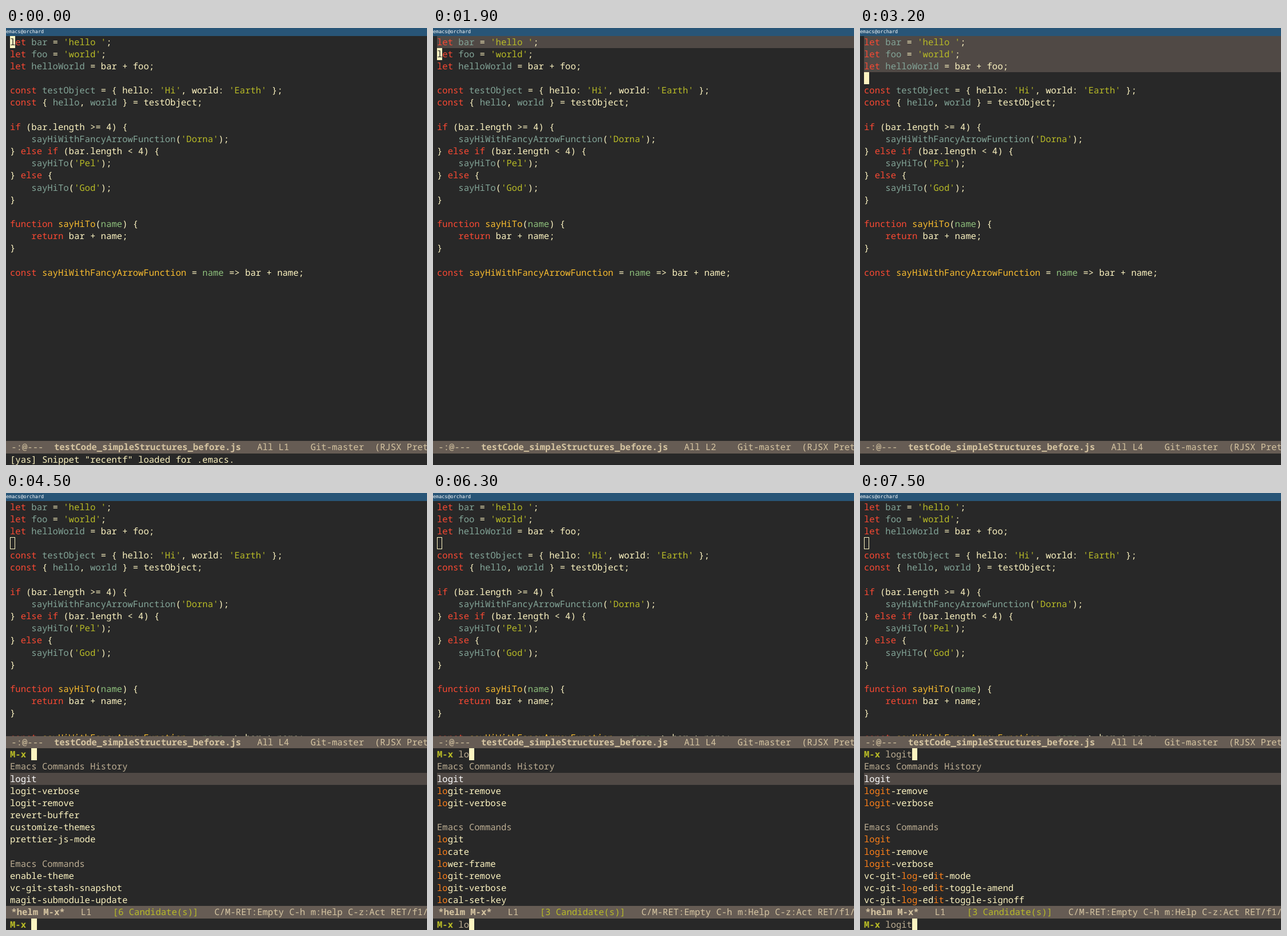
These frames come from a looping animation (735x762 px, 8 s). An HTML page:

```html
<!DOCTYPE html>
<html lang="en">
<head>
<meta charset="utf-8">
<title>Editor session</title>
<style>
  html, body { margin: 0; width: 100%; height: 100%; overflow: hidden; background: #282828; }
  #stage {
    position: relative; width: 735px; height: 762px; overflow: hidden;
    background: #282828; color: #fdf4c1;
    font: 15.555px/21.17px "Noto Sans Mono", "DejaVu Sans Mono", monospace;
    text-rendering: geometricPrecision; font-variant-ligatures: none; white-space: pre;
  }
  #stage div { position: absolute; }
  #title {
    left: 0; top: 0; width: 735px; height: 13.5px; background: #285577; color: #fff;
    font: 8.45px/12px "DejaVu Sans Mono", monospace;
  }
  #code { left: 0; top: 13.5px; width: 735px; overflow: hidden; }
  #panel { left: 0; top: 0; width: 735px; height: 762px; }
  .row { left: 7px; height: 21.17px; }
  .fill { left: 7px; width: 728px; background: #504945; }
  .bar { left: 0; width: 735px; height: 21.17px; background: #665c54; color: #d5c4a1; overflow: hidden; }
  .cursor { width: 9.33px; height: 21.17px; background: #fdf4c1; color: #282828; }
  .hollow { box-sizing: border-box; background: none; border: 1px solid #fdf4c1; }
  .k { color: #fb4933; }
  .v { color: #83a598; }
  .s { color: #b8bb26; }
  .f { color: #fabd2f; }
  .p { color: #8ec07c; }
  .m { color: #fe8019; }
  .h { color: #bdae93; }
  .w { color: #fff; }
  .b { font-weight: bold; }
  .q { color: #b8bb26; font-weight: bold; }
</style>
</head>
<body>
<div id="stage">
  <div id="title">emacs@orchard</div>
  <div id="code"></div>
  <div id="panel"></div>
</div>
<script>
const LINE = 21.17, COL = 9.333, LEFT = 7;
const TOP = 13.5, SPLIT = 424, HELM = 445.2, BAR = 720.4, ECHO = 741.6;
const LOOP = 8000;

// ~x...~ wraps text in class x
const source = `~klet~ ~vbar~ = ~s'hello '~;
~klet~ ~vfoo~ = ~s'world'~;
~klet~ ~vhelloWorld~ = bar + foo;

~kconst~ ~vtestObject~ = { hello: ~s'Hi'~, world: ~s'Earth'~ };
~kconst~ { ~vhello~, ~vworld~ } = testObject;

~kif~ (bar.length >= 4) {
    ~vsayHiWithFancyArrowFunction~(~s'Dorna'~);
} ~kelse~ ~kif~ (bar.length < 4) {
    ~vsayHiTo~(~s'Pel'~);
} ~kelse~ {
    ~vsayHiTo~(~s'God'~);
}

~kfunction~ ~fsayHiTo~(~pname~) {
    ~kreturn~ bar + name;
}

~kconst~ ~fsayHiWithFancyArrowFunction~ = ~pname~ => bar + name;`.split('\n');

const hits = (q, names) => names.map(n => n.startsWith(q) ? `~m${q}~${n.slice(q.length)}` : n);
const group = (history, commands) =>
  ['~hEmacs Commands History~', ...history, '', '~hEmacs Commands~', ...commands];
const search = (q, commands) =>
  group(['~wlogit~', ...hits(q, ['logit-remove', 'logit-verbose'])], hits(q, commands));

const logits = ['logit', 'logit-remove', 'logit-verbose'];
const lists = {
  all: group(
    ['~wlogit~', 'logit-verbose', 'logit-remove', 'revert-buffer', 'customize-themes', 'prettier-js-mode'],
    ['enable-theme', 'vc-git-stash-snapshot', 'magit-submodule-update']),
  l: search('l', ['life', 'lgrep', 'logit', 'locate', 'lisp-mode', 'list-charset-chars']),
  lo: search('lo', ['logit', 'locate', 'lower-frame', 'logit-remove', 'logit-verbose', 'local-set-key']),
  log: search('log', [...logits, 'log-view-mode', 'magit-~mlog~-buffer-file', 'magit-~mlog~-buffer-file-popup']),
  logi: search('logi', [...logits, '~mlog~-ed~mi~t-done', '~mlog~-v~mi~ew-diff', '~mlog~-ed~mi~t-show-files']),
  logit: search('logit', [...logits,
    ...['mode', 'toggle-amend', 'toggle-signoff'].map(n => `vc-git-~mlog~-ed~mit~-${n}`)])
};

const steps = [
  { at: 0, line: 0, echo: '[yas] Snippet "recentf" loaded for .emacs.' },
  { at: 1200, line: 0, echo: 'Mark set' },
  { at: 1900, line: 1 },
  { at: 2900, line: 2 },
  { at: 3200, line: 3 },
  { at: 4500, line: 3, input: '', list: 'all' },
  { at: 5600, line: 3, input: 'l', list: 'all' },
  { at: 5700, line: 3, input: 'l', list: 'l' },
  { at: 6300, line: 3, input: 'lo', list: 'lo' },
  { at: 6600, line: 3, input: 'log', list: 'log' },
  { at: 6800, line: 3, input: 'logi', list: 'log' },
  { at: 6900, line: 3, input: 'logi', list: 'logi' },
  { at: 7500, line: 3, input: 'logit', list: 'logit' }
];

const markup = s => s.replace(/&/g, '&amp;').replace(/</g, '&lt;')
  .replace(/~(\w)(.*?)~/g, '<span class="$1">$2</span>');
const row = (y, s) => `<div class="row" style="top:${y}px">${markup(s)}</div>`;
const bar = (y, s) => `<div class="bar" style="top:${y}px">${markup(s)}</div>`;
const fill = (y, rows) => `<div class="fill" style="top:${y}px;height:${rows * LINE}px"></div>`;
const cursor = (y, col, char = '', kind = '') =>
  `<div class="cursor ${kind}" style="left:${LEFT + col * COL}px;top:${y}px">${char}</div>`;
const rows = (y, list) => list.map((s, i) => row(y + i * LINE, s)).join('');
const prompt = (y, input) => row(y, `~qM-x~ ~h${input}~`) + cursor(y, 4 + input.length);

const codeBox = document.getElementById('code');
const panel = document.getElementById('panel');

const fileBar = (y, line) =>
  bar(y, ` -:@---  ~btestCode_simpleStructures_before.js~   All L${line + 1}    Git-master  (RJSX Prettier)`);

function helm({ input, list }) {
  const count = list === 'all' ? 6 : 3;
  return fill(HELM + 2 * LINE, 1)
    + prompt(HELM, input)
    + rows(HELM + LINE, lists[list])
    + bar(BAR, ` ~b*helm M-x*~   L1    ~s[${count} Candidate(s)]~   C/M-RET:Empty C-h m:Help C-z:Act RET/f1/f2/f-n:NthAct`)
    + prompt(ECHO, input);
}

function draw(step) {
  const { line, echo = '' } = step;
  const open = 'list' in step;
  const barY = open ? SPLIT : BAR;
  codeBox.style.height = `${barY - TOP}px`;
  codeBox.innerHTML = (open ? '' : fill(0, line)) + rows(0, source)
    + cursor(line * LINE, 0, line < 3 ? 'l' : '', open ? 'hollow' : '');
  panel.innerHTML = fileBar(barY, line) + (open ? helm(step) : row(ECHO, echo));
}

let shown;
const start = performance.now();
function tick() {
  const t = (performance.now() - start) % LOOP;
  const step = steps.findLast(s => s.at <= t);
  if (step !== shown) draw(shown = step);
  requestAnimationFrame(tick);
}
tick();
</script>
</body>
</html>
```
